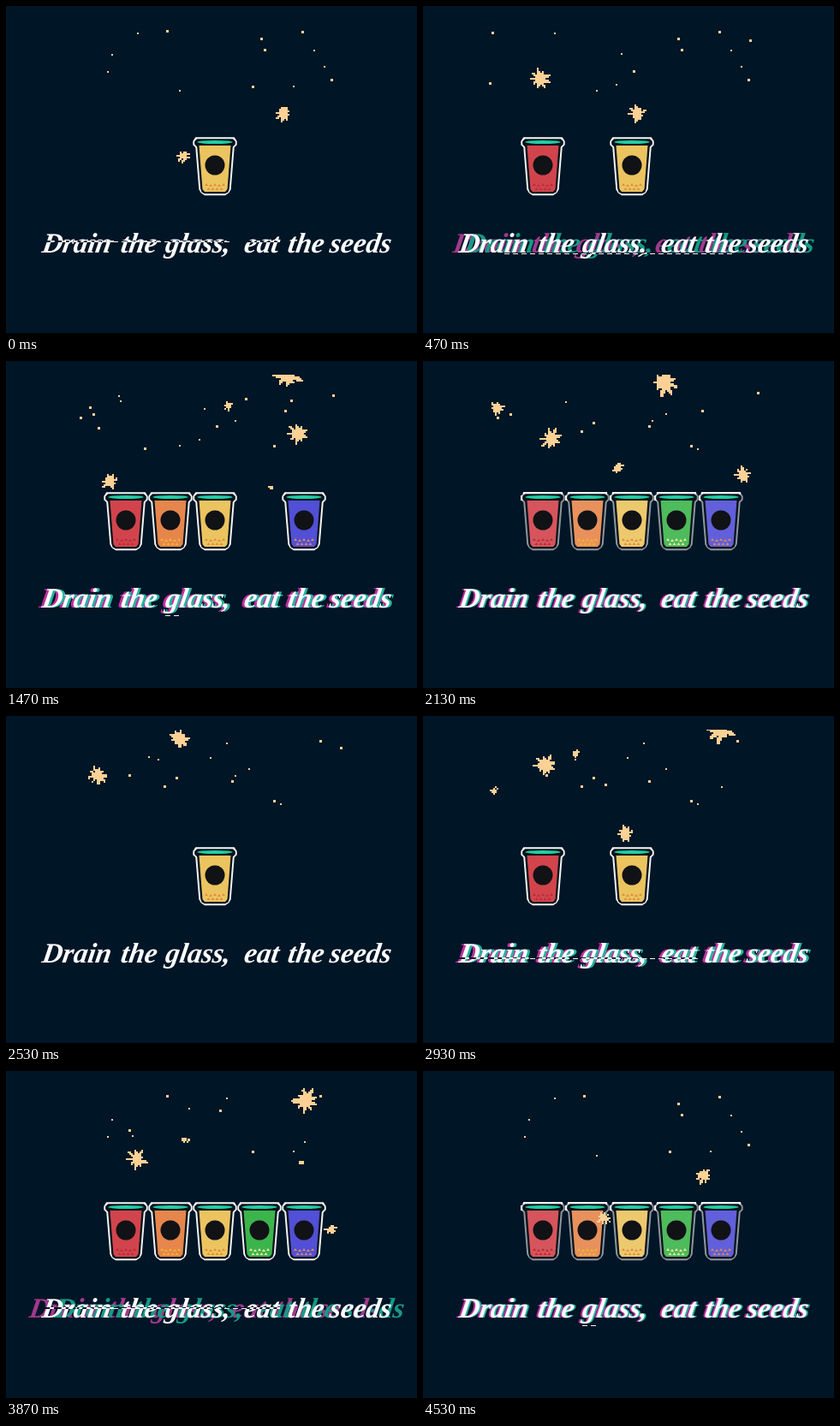
Write an HTML page with a canvas that moves like this. It is 480 px wide and 382 px high and loops after 4.59 s.

```html
<!DOCTYPE html>
<html lang="en">
<head>
<meta charset="utf-8">
<title>Drain the glass</title>
<style>
  html, body { margin: 0; width: 100%; height: 100%; overflow: hidden; background: #001526; }
  canvas { display: block; }
</style>
</head>
<body>
<canvas id="stage" width="480" height="382"></canvas>
<script>
const ctx = document.getElementById('stage').getContext('2d');
const LOOP = 4590, TICK = 1000 / 15, COUNT = 69, HALF = COUNT / 2;
const BG = '#001526', INK = '#08131c', SPARK = '#fdd195', WHITE = '#f4f6f5';

// body, seeds, order of appearance
const cups = [
  ['#d2444c', '#b92c38', 1],
  ['#e6864c', '#f3b52c', 3],
  ['#ebc460', '#e28d3d', 0],
  ['#3cb44c', '#efe6a0', 4],
  ['#5150d6', '#df8755', 2]
];

const words = { 'Drain': 41, 'glass,': 185, 'eat': 277, 'seeds': 377 };
const theAt = [133, 328];

// colour split: tick of the peak, width in px
const pulses = [[8, 9], [24.4, 17], [43, 4.5], [57.3, 17.5]];
const tearStarts = [0, 40, 57];

// brightest bursts: tick, x, y
const bursts = [
  [0, 324, 125], [0, 208, 175], [13, 122, 65], [22, 330, 17], [22, 341, 85], [22, 121, 141],
  [32, 149, 91], [32, 282, 25], [32, 374, 133], [44, 143, 58], [44, 348, 16], [44, 236, 138],
  [58, 153, 103], [58, 350, 35], [58, 380, 185]
];

function noise(n) {
  const v = Math.sin(n * 127.1 + 3.7) * 43758.5453;
  return v - Math.floor(v);
}

// fill the pauses between the bright bursts
for (let i = 0; i < 12; i++) {
  bursts.push([7 + Math.floor(i / 2) * 11, 95 + noise(i) * 290, 25 + noise(i + 30) * 115]);
}

const stars = Array.from({ length: 48 }, (_, i) => ({
  x: 72 + Math.round((i + noise(i + 70)) * 6.7),
  y: 24 + Math.round(noise(i + 130) * 80),
  size: 2 + Math.round(noise(i + 60)),
  on: noise(i + 200) * COUNT,
  life: 14 + noise(i + 260) * 14
}));

function polygon(points, color) {
  ctx.fillStyle = color;
  ctx.beginPath();
  for (const [x, y] of points) ctx.lineTo(x, y);
  ctx.fill();
}

// cup outline around x = 0, widened by g
function cupShape(g) {
  const right = [
    [20 + g, 156 - g], [23 + g, 158], [23 + g, 161 + g / 2], [20 + g, 164 + g / 2],
    [16 + g, 213 + g / 2], [15 + g / 2, 217 + g / 2], [12, 218.5 + g]
  ];
  return [...right, ...right.map(([x, y]) => [-x, y]).reverse()];
}

function drawCup(x, [body, seeds], fading) {
  ctx.save();
  ctx.translate(x, 0);
  polygon(cupShape(2.7), fading ? '#8f989e' : WHITE);
  if (fading) {
    ctx.fillStyle = WHITE;
    ctx.fillRect(-23, 153, 46, 3);
    ctx.fillRect(-26, 157, 3, 6);
  }
  polygon(cupShape(0.8), INK);
  polygon([[-18.5, 163], [18.5, 163], [14.5, 214], [12, 217], [-12, 217], [-14.5, 214]], body);
  if (fading) {
    ctx.fillStyle = 'rgba(255,255,255,.09)';
    ctx.fill();
  }

  ctx.fillStyle = '#1fcfa3';
  ctx.beginPath();
  ctx.ellipse(0, 159, 20.5, 2, 0, 0, 7);
  ctx.fill();

  ctx.fillStyle = '#111216';
  ctx.beginPath();
  ctx.arc(0, 186, 11.5, 0, 7);
  ctx.fill();

  for (let i = 0; i < 9; i++) {
    const low = i > 4;
    const sx = low ? (i - 7) * 5 + 2.5 : (i - 2) * 5;
    const sy = low ? 212 : 207 + i % 2;
    polygon([[sx - 2, sy + 3], [sx, sy], [sx + 2, sy + 3]], seeds);
  }
  ctx.restore();
}

function drawCups(k) {
  const phase = k % HALF;
  cups.forEach((cup, i) => {
    if (phase >= cup[2] * HALF / 6) drawCup(140 + i * 52, cup, phase >= 30);
  });
}

function drawStar({ x, y, size, on, life }, k) {
  if ((k - on + COUNT) % COUNT < life) ctx.fillRect(x, y, size, size);
}

// pixel splat that swells, drifts down to the left and shrinks
function drawBurst([tick, x, y], seed, k) {
  const age = (k - tick + COUNT * 1.5) % COUNT - HALF;
  if (Math.abs(age) >= 5) return;
  const r = (20 - y * 0.06) * (1 - (age / 5) ** 2);
  const cx = x - age * 4, cy = y + age * 3;
  const arms = 9, reach = Math.ceil(r / 2) * 2;
  for (let dy = -reach; dy <= reach; dy += 2) {
    for (let dx = -reach; dx <= reach; dx += 2) {
      const turn = (Math.atan2(dy, dx) / Math.PI / 2 + 1) * arms + age * 0.3;
      const arm = Math.floor(turn);
      const spike = Math.sin((turn - arm) * Math.PI) ** 2 * (0.3 + 0.7 * noise(seed * 9 + arm % arms));
      if (Math.hypot(dx, dy) < r * (0.42 + 0.58 * spike)) {
        ctx.fillRect(Math.round(cx + dx) - 1, Math.round(cy + dy) - 1, 2, 2);
      }
    }
  }
}

function drawSparks(k) {
  ctx.save();
  ctx.beginPath();
  ctx.rect(0, 16, 480, 366);
  ctx.clip();
  ctx.fillStyle = SPARK;
  stars.forEach(star => drawStar(star, k));
  bursts.forEach((burst, i) => drawBurst(burst, i, k));
  ctx.restore();
}

function drawWord(word, x) {
  ctx.save();
  ctx.transform(1, 0, -0.16, 1, x, 288);
  ctx.fillText(word, 0, 0);
  ctx.restore();
}

function drawTitle(dx, color) {
  ctx.font = 'italic bold 33px "Liberation Serif", serif';
  ctx.fillStyle = color;
  for (const word in words) drawWord(word, words[word] + dx);
  for (const x of theAt) drawWord('the', x + dx);
}

function splitAt(k) {
  const rest = k % HALF > 30 ? 1.5 : 0;
  return Math.round(pulses.reduce((sum, [peak, px]) =>
    sum + px * Math.exp(-(((k - peak) / 1.8) ** 2)), rest));
}

// a torn row sweeps down through the letters, then rests below them
function drawTear(k) {
  const age = k - tearStarts.filter(start => start <= k).pop();
  if (age > 23) return;
  const y = Math.min(275 + age * 2, 297);
  const below = y > 290;
  if (!below) {
    ctx.save();
    ctx.beginPath();
    ctx.rect(0, y - 1, 320, 2);
    ctx.clip();
    ctx.fillStyle = BG;
    ctx.fillRect(38, y - 1, 282, 2);
    drawTitle(4, '#fff');
    ctx.restore();
  }
  ctx.fillStyle = WHITE;
  const left = below ? 186 : 95, right = below ? 199 : 265 + (y - 275) * 7;
  for (let x = left; x < right; x += 10) ctx.fillRect(x, y, 6, 1);
}

function drawText(k) {
  const split = splitAt(k);
  if (split) {
    const wide = split > 6;
    drawTitle(-split, wide ? '#a03a8c' : '#c02fa0');
    drawTitle(split, wide ? '#159a85' : '#27b3a0');
  }
  drawTitle(0, '#fff');
  drawTear(k);
}

function draw(ms) {
  const k = Math.floor((ms % LOOP + 4) / TICK) % COUNT;
  ctx.fillStyle = BG;
  ctx.fillRect(0, 0, 480, 382);
  drawCups(k);
  drawText(k);
  drawSparks(k);
}

const start = performance.now();
function loop() {
  draw(performance.now() - start);
  requestAnimationFrame(loop);
}
loop();
</script>
</body>
</html>
```
